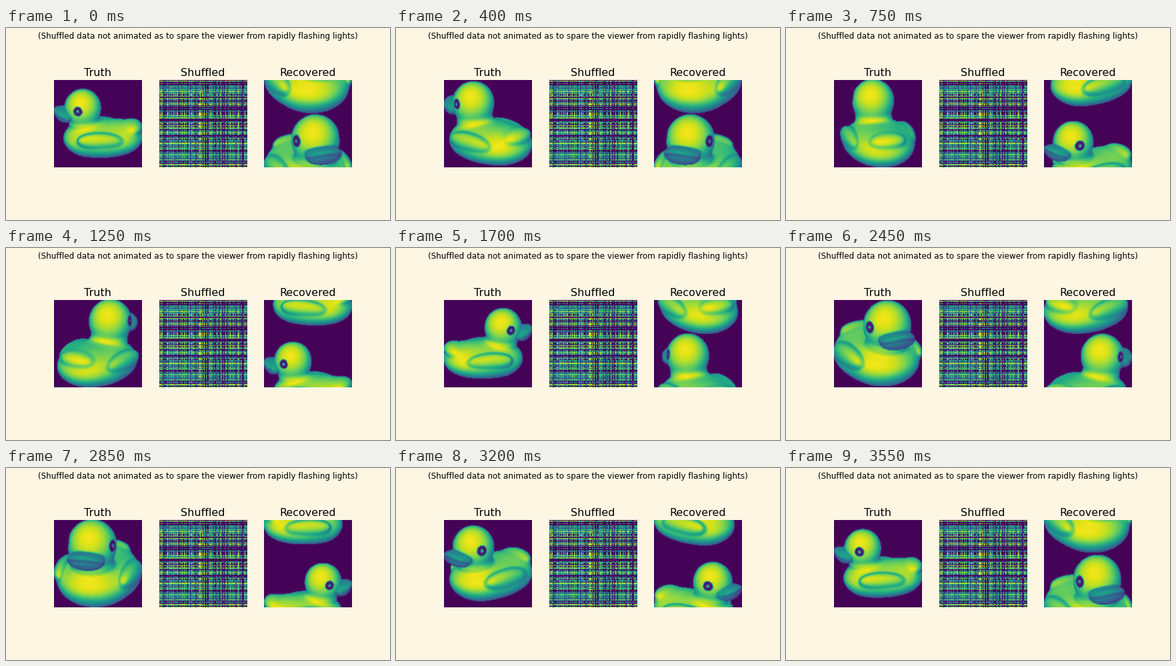
Animation, 576 px wide and 288 px high, one loop 3600 ms. Source, as a matplotlib script:

```python
import numpy as np
import matplotlib.pyplot as plt
from matplotlib.animation import FuncAnimation

STEPS = 72
SIZE = 128
TILT = np.radians(20)
LIGHT = np.array([-0.14, 0.25, 0.957])
BACKGROUND = 0.01
ROW_SHIFT, STEP_SHIFT = 50, 50
BLEND = 3.0
PAPER = "#fdf6e3"

# Ellipsoids as (centre, radii); axes are forward, sideways, up.
BODY = ((0, 0, 0), (57, 45, 26))
CHEST = ((23, 0, -1), (32, 36, 23))
RUMP = ((-27, 0, 3), (29, 34, 22))
TAIL = ((-45, 0, 18), (13, 22, 9))
NECK = ((27, 0, 24), (22, 22, 15))
HEAD = ((30, 0, 48), (27, 27, 28))
WINGS = [((6, side * 38, 9), (29, 9, 10)) for side in (1, -1)]
BEAK = ((56, 0, 38), (17, 21, 10.5))
BEAK_CURL = 6
EYES = [np.array([37, side * 25, 51.5]) for side in (1, -1)]
SKIN = [BODY, CHEST, RUMP, TAIL, NECK, HEAD] + WINGS


def sphere(count):
    """Evenly spread points on the unit sphere."""
    k = np.arange(count) + 0.5
    z = 1 - 2 * k / count
    turn = np.pi * (1 + 5 ** 0.5) * k
    r = np.sqrt(1 - z * z)
    return np.column_stack([r * np.cos(turn), r * np.sin(turn), z])


def unit(vectors):
    return vectors / np.linalg.norm(vectors, axis=1, keepdims=True)


def reach(points, part):
    """Relative distance from a part: 1 on its surface."""
    centre, radii = part
    return np.linalg.norm((points - centre) / radii, axis=1)


def skin_field(points):
    """Distance to the smoothly joined skin, and its outward normal."""
    total = np.zeros(len(points))
    push = np.zeros(points.shape)
    for part in SKIN:
        centre, radii = part
        slope = (points - centre) / np.square(radii)
        steep = np.linalg.norm(slope, axis=1) + 1e-9
        near = reach(points, part)
        weight = np.exp(-near * (near - 1) / steep / BLEND)
        total += weight
        push += (weight / steep)[:, None] * slope
    return -BLEND * np.log(total + 1e-12), unit(push + 1e-12)


def build_skin():
    clouds = []
    for centre, radii in SKIN:
        a, b, c = radii
        area = 4 * np.pi * (a * b + b * c + a * c) / 3
        clouds.append(sphere(int(6 * area)) * radii + centre)
    points = np.concatenate(clouds)
    points = points[skin_field(points)[0] > -5.5]
    for _ in range(4):
        dist, normals = skin_field(points)
        points = points - dist[:, None] * normals
    normals = skin_field(points)[1]

    albedo = np.ones(len(points))
    for wing in WINGS:
        rim = (reach(points, wing) - 1.2) / 0.13
        albedo *= 1 - 0.2 * np.exp(-rim ** 2)
    under = np.clip((reach(points, BEAK) - 1) / 0.3, 0, 1)
    albedo *= 1 - 0.3 * (1 - under) ** 2
    for eye in EYES:
        dist = np.linalg.norm(points - eye, axis=1)
        for radius, shade in ((7, 0.4), (6.2, 0.06), (3.2, 0.22), (1.7, 0.9)):
            albedo[dist < radius] = shade
    return points, normals, albedo


def build_beak():
    centre, radii = BEAK
    ball = sphere(30000)
    points = ball * radii + centre
    points[:, 2] += BEAK_CURL * ball[:, 0] ** 2
    normals = ball / radii
    normals[:, 0] -= 2 * BEAK_CURL * ball[:, 0] / radii[0] * normals[:, 2]
    mouth = np.exp(-(ball[:, 2] / 0.16) ** 2) * (ball[:, 0] > 0)
    albedo = 0.6 * (1 - 0.4 * mouth)
    seen = skin_field(points)[0] > -0.5
    return points[seen], unit(normals)[seen], albedo[seen]


def to_view(vectors, angle):
    """Screen right, screen up and depth towards the viewer."""
    fwd, side, up = vectors.T
    c, s = np.cos(angle), np.sin(angle)
    right = -fwd * c - side * s
    near = -fwd * s + side * c
    return (right,
            up * np.cos(TILT) - near * np.sin(TILT),
            near * np.cos(TILT) + up * np.sin(TILT))


def soften(img):
    for _ in range(2):
        pad = np.pad(img, ((1, 1), (0, 0)), mode="edge")
        img = (0.15 * pad[:-2] + 0.7 * img + 0.15 * pad[2:]).T
    return img


def render(duck, angle):
    points, normals, albedo = duck
    nx, ny, nz = to_view(normals, angle)
    x, y, depth = to_view(points, angle)
    # The duck always fills the square along its longer side.
    scale = (SIZE - 0.5) / max(np.ptp(x), np.ptp(y))
    col = (x - (x.min() + x.max()) / 2) * scale + SIZE / 2
    row = (-y + (y.min() + y.max()) / 2) * scale + SIZE / 2
    lit = np.clip(nx * LIGHT[0] + ny * LIGHT[1] + nz * LIGHT[2], 0, 1)
    value = np.clip(albedo * (0.34 + 0.64 * lit), 0, 1)

    front = np.flatnonzero(nz > -0.05)
    front = front[np.argsort(depth[front])]
    img = np.full((SIZE, SIZE), BACKGROUND)
    img[row[front].astype(int), col[front].astype(int)] = value[front]
    return soften(img)


duck = [np.concatenate(pair) for pair in zip(build_skin(), build_beak())]
truth = [render(duck, 2 * np.pi * k / STEPS) for k in range(STEPS)]
rng = np.random.default_rng(4)
shuffled = truth[0][rng.permutation(SIZE)][:, rng.permutation(SIZE)]


def recovered(k):
    return np.roll(truth[(k + STEP_SHIFT) % STEPS], ROW_SHIFT, axis=0)


plt.rcParams["font.family"] = "DejaVu Sans"
fig = plt.figure(figsize=(8, 4), dpi=72, facecolor=PAPER)
fig.suptitle("(Shuffled data not animated as to spare the viewer "
             "from rapidly flashing lights)", fontsize=12)


def panel(index, title, data):
    width = 446.4 / 3.4
    left = 72 + index * 1.2 * width
    ax = fig.add_axes([left / 576, 79 / 288, width / 576, 131 / 288])
    ax.set_axis_off()
    ax.set_title(title, fontsize=16, pad=6)
    return ax.imshow(data, cmap="viridis", vmin=0, vmax=1, aspect="auto")


truth_img = panel(0, "Truth", truth[0])
panel(1, "Shuffled", shuffled)
recovered_img = panel(2, "Recovered", recovered(0))


def update(k):
    truth_img.set_data(truth[k])
    recovered_img.set_data(recovered(k))
    return truth_img, recovered_img


anim = FuncAnimation(fig, update, frames=STEPS, interval=50, repeat=True, repeat_delay=0)
plt.show()
```
